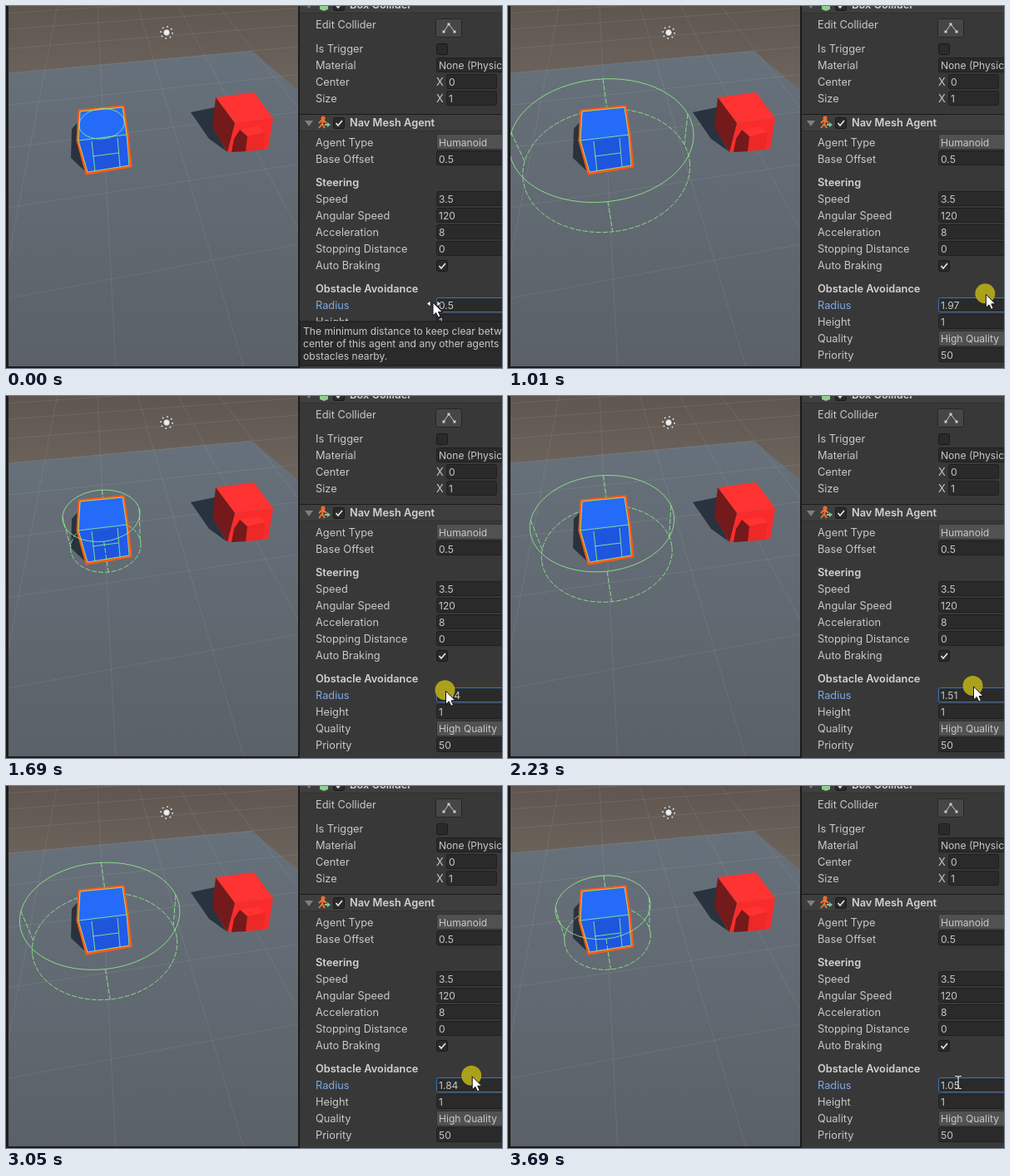
An HTML page for the animation above (4230 ms loop, 596 px wide and 436 px high).

```html
<!DOCTYPE html>
<html lang="en">
<head>
<meta charset="utf-8">
<style>
html, body { margin: 0; width: 100%; height: 100%; overflow: hidden; background: #383838; }
svg { display: block; }
text { font: 12.8px Inter, "Open Sans", sans-serif; fill: #c8c8c8; }
.small { font-size: 12.1px; }
.bold { font-weight: 600; fill: #d2d2d2; }
.focus { fill: #7fa8e8; }
.wire { fill: none; stroke: #92ee8b; stroke-opacity: .85; }
.dashed { stroke-dasharray: 6 2; }
</style>
</head>
<body>
<svg id="stage" width="596" height="436" viewBox="0 0 596 436">
  <defs>
    <linearGradient id="sky" x2="0" y2="1"><stop stop-color="#5f5650"/><stop offset="1" stop-color="#6e655d"/></linearGradient>
    <linearGradient id="ground" x2="0" y2="1"><stop stop-color="#67717b"/><stop offset="1" stop-color="#5b6168"/></linearGradient>
  </defs>
  <rect width="353" height="436" fill="#1b1b1b"/>
  <svg x="3" width="348" height="434" viewBox="3 0 348 434">
    <rect x="3" width="348" height="104" fill="url(#sky)"/>
    <path d="M3 81L295 54L351 101V434H3z" fill="url(#ground)"/>
    <path id="grid" stroke="#fff" stroke-opacity=".08"/>
    <g stroke="#ddd" fill="#eee">
      <circle cx="193" cy="32" r="3.2"/>
      <circle cx="193" cy="32" r="4.8" fill="none" stroke="#555"/>
      <circle cx="193" cy="32" r="7" fill="none" stroke-width="2" stroke-dasharray="1.5 4"/>
    </g>
    <path d="M222 128L251 122V150L265 175L244 160z" fill="#29323f"/>
    <path d="M252 110L298 104L321 135L275 141z" fill="#ff3331"/>
    <path d="M275 141L321 135L315 172L266 176z" fill="#fa2c2b"/>
    <path d="M252 110L275 141L266 176L248 146z" fill="#741a1a"/>
    <path d="M281 149L303 145L312 152L290 157z" fill="#ff3331"/>
    <path d="M290 157L312 152L309 173L288 175z" fill="#ec2927"/>
    <path d="M281 149L290 157L288 175L271 176L274 160z" fill="#741a1a"/>
    <path d="M79 148L87 139L96 200L78 183z" fill="#29323f"/>
    <path id="behind" class="wire dashed"/>
    <path d="M88 126L141 121L146 155L150 193L97 202L86 162z" fill="#205ce8"/>
    <path d="M88 126L141 121L146 155L86 162z" fill="#246cf8"/>
    <path d="M103 163L134 159L137 194L107 199z" fill="#1e55dc"/>
    <path d="M88 126L141 121L146 155L150 193L97 202L86 162z" fill="none" stroke="#ff5a14" stroke-width="3" stroke-linejoin="round"/>
    <path class="wire" d="M89 127L140 122L145 155L148 192L98 200L87 162zM87 162L145 155M103 163L107 199M134 159L137 194M104 181L135 177"/>
    <path id="top" class="wire"/>
    <path id="front" class="wire dashed"/>
  </svg>
  <g id="panel"></g>
  <g id="tooltip">
    <rect x="353" y="380" width="250" height="53" fill="#2a2a2a" stroke="#1b1b1b"/>
    <text class="small" x="357" y="396">The minimum distance to keep clear between the</text>
    <text class="small" x="357" y="411">center of this agent and any other agents or</text>
    <text class="small" x="357" y="426">obstacles nearby.</text>
  </g>
  <g id="pointer">
    <circle id="press" cx="-1" cy="-1" r="12" fill="#b2a71a" opacity=".95"/>
    <path id="slide" d="M-3 -2V5L-7.500 1.500zM5 -2V5L9.500 1.500z" fill="#fff" stroke="#111" stroke-width=".7"/>
    <path d="M0 0V16L3.700 12.500L6.300 18L9 16.800L6.500 11.500H11.500z" fill="#fff" stroke="#111"/>
  </g>
  <path id="beam" d="M537 349.500H540L541 351L542 349.500H545M541 351V363M537 364.500H540L541 363L542 364.500H545" fill="none" stroke="#ddd" stroke-width="1.200"/>
</svg>
<script>
const LOOP = 4230;
const $ = id => document.getElementById(id);
const show = (id, on) => { $(id).style.display = on ? '' : 'none'; };
const lerp = (a, b, p) => a + (b - a) * p;
const range = (n, make) => Array.from({ length: n }, (_, i) => make(i)).join('');

// Inspector panel: every control is a function of its row's middle
const label = (x, y, text, kind = '', id = '') => `<text id="${id}" class="${kind}" x="${x}" y="${y + 4}">${text}</text>`;
const box = (x, y, w, h, fill, stroke) =>
  `<rect x="${x}" y="${y}" width="${w}" height="${h}" rx="2" fill="${fill}" stroke="${stroke}"/>`;
const field = (text, x = 517, w = 90, edge = '#1f1f1f', id) => y =>
  box(x + .5, Math.floor(y) - 9.5, w, 17, '#2a2a2a', edge) + label(x + 3, y, text, 'small', id);
const vector = text => y => label(517, y, 'X') + field(text, 529, 60)(y);
const dropdown = text => y => box(517.5, Math.floor(y) - 9.5, 90, 18, '#515151', '#303030') + label(520, y, text, 'small');
const check = (on, x = 517) => y => box(x + .5, y - 6.5, 13, 13, '#2a2a2a', '#191919') +
  (on ? `<path d="M${x + 3.5} ${y}l2.500 3l5 -6" fill="none" stroke="#e4e4e4" stroke-width="1.700"/>` : '');
const heading = (x, y, text) => label(x, y, text, 'bold');
const header = (y, text) => `<rect x="353" y="${y - 10}" width="243" height="20" fill="#3e3e3e"/>
  <path d="M353 ${y - 10.5}H596" stroke="#1a1a1a"/><path d="M353 ${y + 9.5}H596" stroke="#303030"/>
  <path d="M359 ${y - 3}H369L364 ${y + 4}z" fill="#808080"/>` + check(true, 393)(y) + heading(413, y, text);
const colliderButton = () => box(516.5, 15.5, 31, 22, '#464646', '#262626') +
  '<path d="M526 31L532 22L539 31" fill="none" stroke="#ccc"/>' +
  '<path d="M524.500 29.500h3v3h-3zM530.500 20.500h3v3h-3zM537.500 29.500h3v3h-3z" fill="#ccc"/>';
const stack = (y, rows) => Object.entries(rows)
  .map(([name, control], i) => label(372, y + i * 20, name, name === 'Radius' ? 'focus' : '') + control(y + i * 20)).join('');

$('panel').innerHTML = '<rect x="353" width="243" height="436" fill="#383838"/>' +
  header(-1, 'Box Collider') + header(141, 'Nav Mesh Agent') +
  '<path d="M377 -6H387V4L382 6L377 4z" fill="#8bd08b"/>' +
  `<g fill="none" stroke="#ee7430" stroke-width="2"><circle cx="381" cy="135" r="1.500"/>
   <path d="M376 141L379 138H382L385 141M381 138L380 142L383 147M380 142L376 147"/></g>
   <path d="M383 142H386V140L390 143L386 146V144H383z" fill="#6fce9a"/>` +
  stack(23, { 'Edit Collider': colliderButton }) +
  stack(52, { 'Is Trigger': check(false), Material: field('None (Physic Material)'), Center: vector(0), Size: vector(1) }) +
  stack(164.5, { 'Agent Type': dropdown('Humanoid'), 'Base Offset': field(0.5) }) +
  heading(372, 213, 'Steering') +
  stack(233, { Speed: field(3.5), 'Angular Speed': field(120), Acceleration: field(8),
    'Stopping Distance': field(0), 'Auto Braking': check(true) }) +
  heading(372, 341, 'Obstacle Avoidance') +
  stack(361, { Radius: field('', 517, 90, '#3f73b5', 'radius'), Height: field(1),
    Quality: dropdown('High Quality'), Priority: field(50) });

// Ground grid: two families of lines, each running to a vanishing point
$('grid').setAttribute('d',
  range(5, i => `M100 -200L${-27 + i * 160} 460`) +
  range(8, i => `M3 ${1 / (.001876 + i * .000485) - 181}L2855 -181`));

// Circle seen in perspective, slightly tilted
const TILT = -6;
function ring(cx, cy, rx, ry) {
  const c = Math.cos(TILT * Math.PI / 180), s = Math.sin(TILT * Math.PI / 180);
  const at = deg => {
    const a = deg * Math.PI / 180, x = rx * Math.cos(a), y = ry * Math.sin(a);
    return `${cx + x * c - y * s} ${cy + x * s + y * c}`;
  };
  const half = (from, to) => `M${at(from)}A${rx} ${ry} ${TILT} 0 1 ${at(to)}`;
  return { at, near: half(0, 180), far: half(180, 360) };
}
function drawCylinder(r) {
  const top = ring(116 - 1.9 * r, 140.5 + 5.2 * r * r, 54.6 * r, 36.3 * r);
  const base = ring(121 - 1.4 * r, 177.5 + 5 * r * r, 49.4 * r, 36.3 * r);
  const side = Math.asin(.14 * r) * 180 / Math.PI;
  const post = deg => `M${top.at(deg)}L${base.at(deg)}`;
  const near = base.near + [90, -side, 180 + side].map(post).join('');
  const insideCube = r < .6;
  $('behind').setAttribute('d', base.far + post(-85));
  $('top').setAttribute('d', top.near + top.far);
  $('front').setAttribute('d', insideCube ? '' : near);
}

// Each drag sweeps the radius in steps of about 70 ms
const drags = [
  { start: 590, end: 1150, from: .5, to: 2.34 },
  { start: 1350, end: 1830, from: 2.34, to: .495 },
  { start: 1960, end: 2510, from: .63, to: 2.39 },
  { start: 2840, end: 3360, from: 2.39, to: 1.05 }
];
const ease = p => (p + p * p * (3 - 2 * p)) / 2;
function radiusAt(t, lead) {
  const { start, end, from, to } = drags.findLast(d => t >= d.start) || { ...drags[0], to: .5 };
  const steps = Math.round((end - start) / 70);
  const step = Math.floor((t - start) / (end - start) * steps + .18);
  return lerp(from, to, ease(Math.max(0, Math.min(1, (step + lead) / steps))));
}

function draw(t) {
  // The number trails the cylinder, which trails the pointer
  $('radius').textContent = +radiusAt(t, 0).toFixed(2);
  drawCylinder(radiusAt(t, .3));
  const pull = radiusAt(t, .6) - .5;
  const x = t < 330 ? 513 : 519 + pull / .029;
  $('pointer').setAttribute('transform', `translate(${x} ${357 - 6 * pull})`);
  show('tooltip', t < 260);
  show('press', t >= 330 && t < 3630);
  show('slide', t < 660);
  show('pointer', t < 3690);
  show('beam', t >= 3690);
}
const start = performance.now();
(function tick() {
  draw((performance.now() - start) % LOOP);
  requestAnimationFrame(tick);
})();
</script>
</body>
</html>
```
